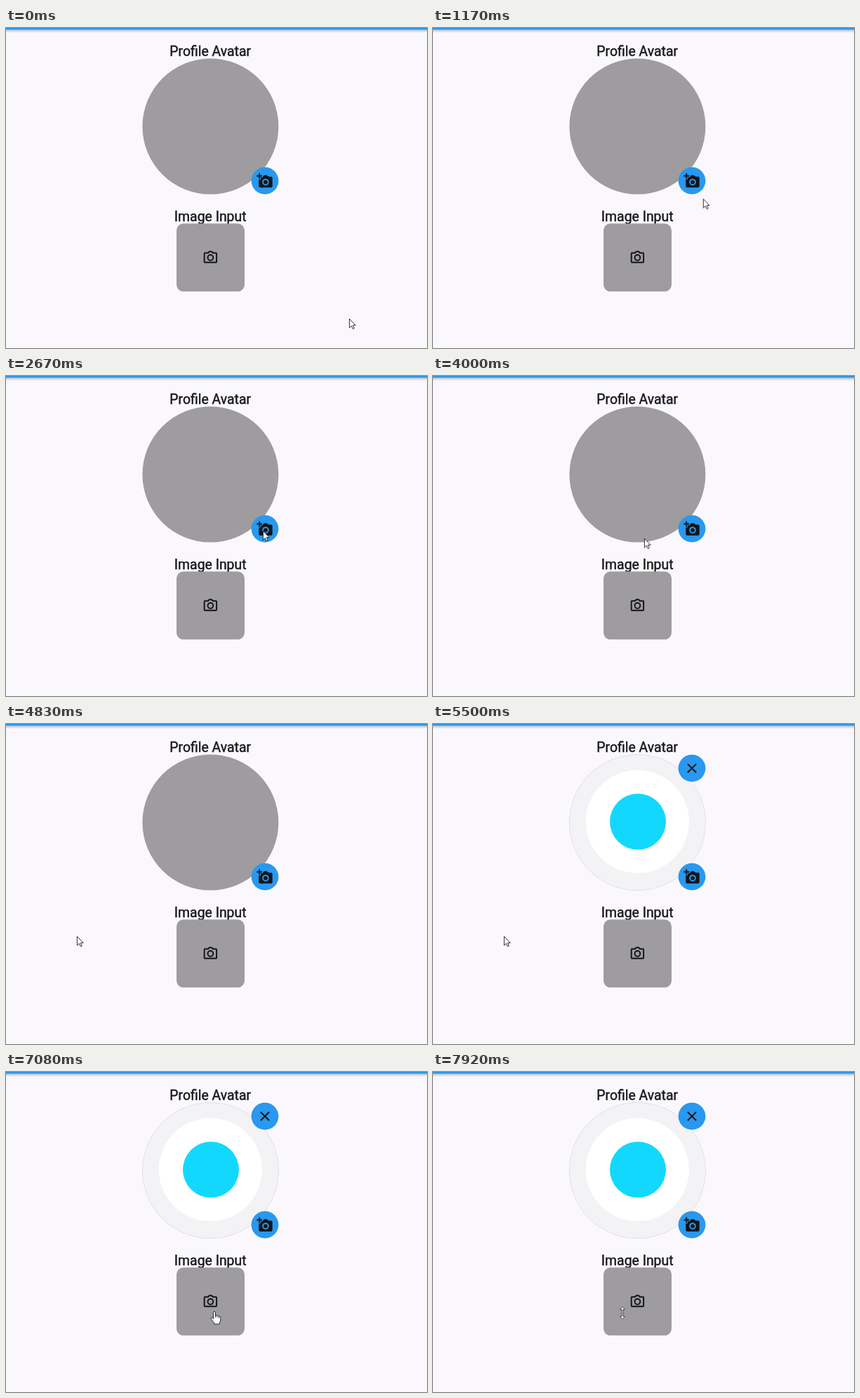
These frames come from a looping animation (600 px wide and 457 px high, 8 s). An HTML page:

```html
<!DOCTYPE html>
<html lang="en">
<head>
<meta charset="utf-8">
<title>Image pickers</title>
<style>
  html, body { margin: 0; width: 100%; height: 100%; overflow: hidden; background: #faf8fc; }
  svg { display: block; width: 100%; height: 100%; }
  text { font: 19.4px Roboto, sans-serif; fill: #19191b; stroke: #19191b; stroke-width: .45; text-anchor: middle; }
  .blue { fill: #2998ee; }
  .grey { fill: #9e9c9f; }
  .line { fill: none; stroke: #131518; stroke-width: 2; }
  .solid { fill: #131518; stroke: #131518; stroke-width: 2; }
  .cursor { fill: #fff; stroke: #17171b; stroke-width: .9; stroke-linejoin: round; }

  #picked, .cursor, .cursor > * { animation: 8s step-end infinite; }
  #picked { animation-name: picked; }
  #arrow { animation-name: arrow; }
  #hand { animation-name: hand; }
  #resize { animation-name: resize; }
  .cursor { animation-name: travel; animation-timing-function: linear; }

  @keyframes picked { 0% { visibility: hidden; } 66.6%, to { visibility: visible; } }
  @keyframes arrow {
    0%, 33.3% { visibility: visible; }
    19%, 84.5%, to { visibility: hidden; }
  }
  @keyframes hand {
    0%, 33.3%, 98%, to { visibility: hidden; }
    19%, 84.5% { visibility: visible; }
  }
  @keyframes resize { 0% { visibility: hidden; } 98%, to { visibility: visible; } }

  @keyframes travel {
    0%, 7.3% { transform: translate(489px, 415px); }
    11.4%, 13.6% { transform: translate(466px, 351px); }
    14.6% { transform: translate(385px, 244px); }
    19.7%, 21% { transform: translate(363px, 209px); }
    26%, 33.4% { transform: translate(366px, 221px); }
    38.5%, 49% { transform: translate(344px, 223px); }
    56.2% { transform: translate(38px, 285px); }
    59.4%, 68.8% { transform: translate(101px, 303px); }
    72.9%, 78.1% { transform: translate(89px, 321px); }
    85.4%, 94.8% { transform: translate(297px, 342px); }
    98.9%, to { transform: translate(270px, 344px); }
  }
</style>
</head>
<body>
<svg viewBox="0 0 600 457">
  <defs>
    <linearGradient id="shadow" x2="0" y2="1">
      <stop stop-color="#8b95a2" stop-opacity=".6"/>
      <stop offset="1" stop-color="#8b95a2" stop-opacity="0"/>
    </linearGradient>
    <path id="camera" d="M4 6H8.5L10.3 4H13.7L15.5 6H20Q21 6 21 7V19Q21 20 20 20H4Q3 20 3 19V7Q3 6 4 6Z"/>
    <circle id="button" class="blue" r="19.4"/>
  </defs>
  <rect y="2" width="600" height="5" fill="url(#shadow)"/>
  <rect class="blue" width="600" height="2.4"/>

  <text x="291.2" y="40.2">Profile Avatar</text>
  <circle class="grey" cx="291.4" cy="140.6" r="97"/>

  <g id="picked">
    <circle cx="291.4" cy="140.6" r="97" fill="#f3f2f5" stroke="#e4e3e6" stroke-width=".7"/>
    <circle cx="291.4" cy="139.4" r="73.6" fill="#fff"/>
    <circle cx="292" cy="139.5" r="40" fill="#13d8fd"/>
    <g transform="translate(369 63.2)">
      <use href="#button"/>
      <path class="line" d="M-6.1-6.1 6.1 6.1M6.1-6.1-6.1 6.1"/>
    </g>
  </g>

  <g transform="translate(369 218.1)">
    <use href="#button"/>
    <g transform="scale(.97) translate(-12 -12)">
      <use href="#camera" class="solid" x="1" y="1"/>
      <circle cx="13" cy="14" r="4" fill="none" stroke="#2998ee" stroke-width="2"/>
      <path class="blue" d="M0 0H9V7H6V10H0Z"/>
      <path class="line" d="M4 1V9M0 5H8"/>
    </g>
  </g>

  <text x="291.2" y="275.8">Image Input</text>
  <rect class="grey" x="243" y="279.3" width="97" height="97" rx="9.7"/>
  <g class="line" transform="translate(291.4 327) scale(.97) translate(-12 -12)">
    <use href="#camera"/>
    <circle cx="12" cy="13" r="4"/>
  </g>

  <g class="cursor">
    <path id="arrow" d="M.4.4V13.2L3.4 10.4 5.3 14.8 7.3 13.9 5.4 9.6H9.2z"/>
    <g id="hand">
      <path d="M-1.5 10.5V1.5Q-1.5.2 0 .2T1.5 1.5V6Q3.3 4.8 4 6.4 6 5.6 6.5 7.2 8.8 6.7 8.8 9V12.5Q8.7 14.5 7.3 15.8V18H-.4V16.2Q-2.6 14.1-4.6 10.5C-5.2 8.6-3.1 7.8-1.5 10.5z"/>
      <path d="M1.5 6V9M4 6.7V9.2M6.5 7.5V9.7" fill="none" stroke-width=".7"/>
    </g>
    <path id="resize" stroke-width=".7" d="M0-8.6 3.4-5H.9V5H3.4L0 8.6-3.4 5H-.9V-5H-3.4z"/>
  </g>
</svg>
</body>
</html>
```
